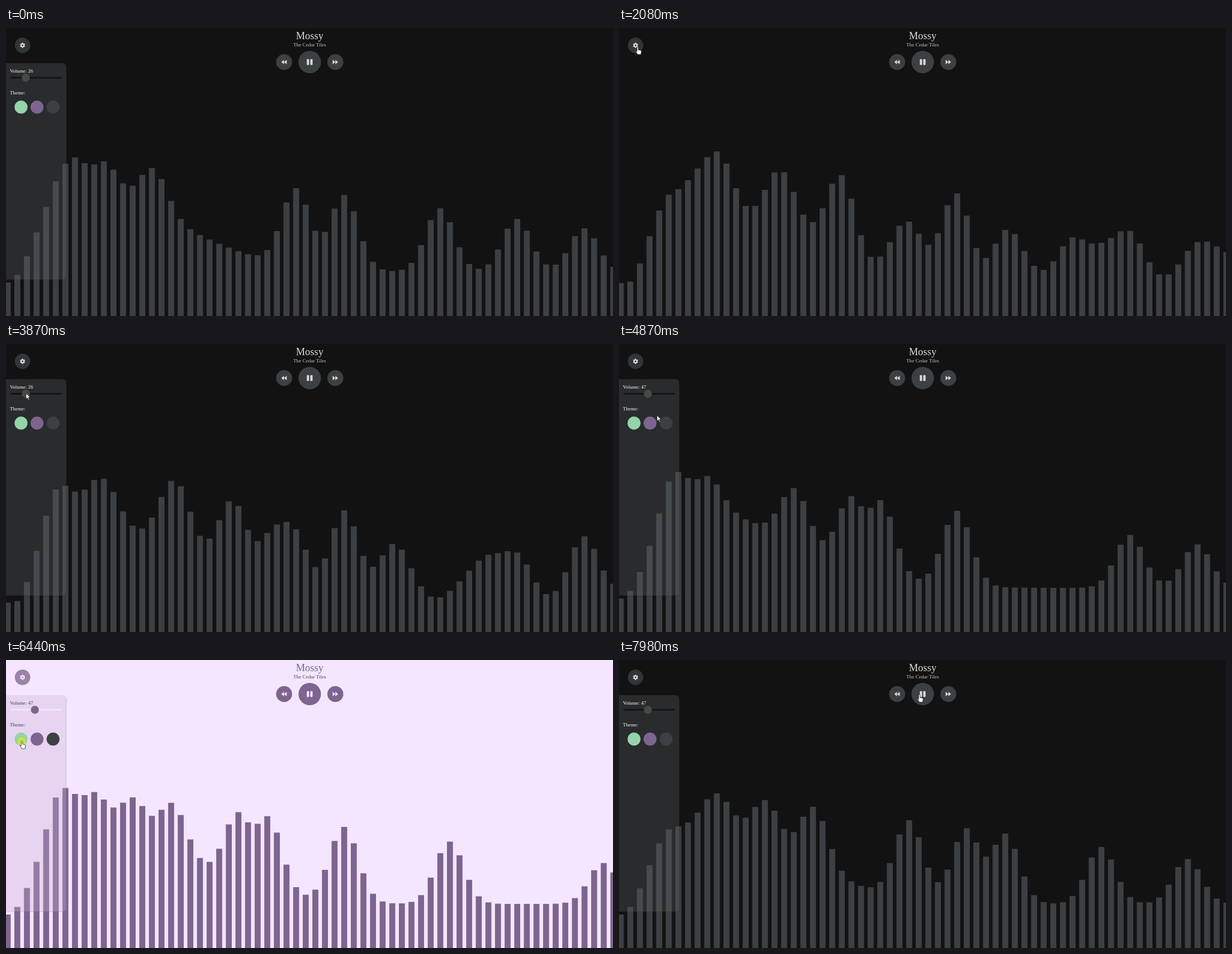
Recreate the animation shown at these times as an HTML page. Size 1086 px wide and 516 px high, loop 8 s.

```html
<!DOCTYPE html>
<html lang="en">
<head>
<meta charset="utf-8">
<title>Music visualizer</title>
<style>
html, body { margin: 0; width: 100%; height: 100%; overflow: hidden; }
svg { display: block; width: 1086px; height: 516px; background: var(--bg); font-family: "Liberation Serif", "Times New Roman", serif; }
.dark { --bg: #121212; --main: #3c4043; --icon: #d8d9da; --title: #dcdcdc; --sub: #c4c4c4; --text: #fff; --thumb: #484848; --panel: rgba(95,99,104,.3); }
.purple { --bg: #f4e6ff; --main: #7d6590; --icon: #f4e6ff; --title: #7d6590; --sub: #4a4650; --text: #3c4043; --thumb: #7d6590; --panel: rgba(200,171,206,.31); }
.green { --bg: #f0fcf0; --main: #94d3ac; --icon: #f0fcf0; --title: #94d3ac; --sub: #4a504c; --text: #3c4043; --thumb: #94d3ac; --panel: rgba(193,229,203,.32); }
#bars, #buttons { fill: var(--main); }
#icons { fill: var(--icon); }
#panel text { fill: var(--text); font-size: 9px; }
.cursor { fill: #fff; stroke: #222; stroke-width: .8; stroke-linejoin: round; }
</style>
</head>
<body>
<svg id="stage" class="dark" viewBox="0 0 1086 516">
  <g id="bars"></g>

  <g text-anchor="middle">
    <text x="543.3" y="20.3" font-size="18.4" fill="var(--title)">Mossy</text>
    <text x="543.3" y="33" font-size="9.2" fill="var(--sub)">The Cedar Tiles</text>
  </g>

  <g id="buttons"></g>
  <g id="icons">
    <g id="gear" transform="translate(29.6 31)">
      <circle r="2.5" fill="none" stroke="var(--icon)" stroke-width="2.1"/>
    </g>
    <path id="skip" d="M492.6 61l4.8-4v8zm4.9 0l4.8-4v8z"/>
    <use href="#skip" transform="matrix(-1 0 0 1 1086.7 0)"/>
    <rect x="538.2" y="55.7" width="4.1" height="10.6" rx="1"/>
    <rect x="544.4" y="55.7" width="4.1" height="10.6" rx="1"/>
  </g>

  <g id="panel">
    <path d="M0 63h101a7 7 0 0 1 7 7v374a7 7 0 0 1-7 7h-101z" fill="var(--panel)"/>
    <path d="M107.9 68v376a7 7 0 0 1-7 7h-101" fill="none" stroke="#000" stroke-opacity=".13"/>
    <text id="volume" x="7" y="80.3"></text>
    <rect x="7.6" y="87.7" width="92.6" height="2.7" rx="1.3" fill="var(--bg)"/>
    <circle id="thumb" cy="89.2" r="7.2" fill="var(--thumb)"/>
    <text x="7" y="119.3">Theme:</text>
  </g>

  <g id="pointer">
    <circle id="press" r="7.5" fill="#eef000" fill-opacity=".57"/>
    <path id="arrow" class="cursor" d="M0 0v10l2.4-2.2 1.7 3.6 1.6-.8-1.7-3.5h3.2z"/>
    <path id="hand" class="cursor" d="M-.8 1.2a1.2 1.2 0 0 1 2.4 0v4l4.2 1q1.6.5 1.3 2.1l-.9 5.2h-5.6l-3.6-5q.4-1.7 2.2 0z"/>
  </g>
</svg>
<script>
const LOOP = 8000, STEP = 77.6, BARS = 64, PRESS = 130;
const $ = id => document.getElementById(id);
const clamp = (v, lo, hi) => Math.max(lo, Math.min(hi, v));
const mix = (a, b, u) => a + (b - a) * u;
const ease = (t, from, to) => {
  const u = clamp((t - from) / (to - from), 0, 1);
  return u * u * (3 - 2 * u);
};
const make = (parent, tag, attrs) => {
  const el = document.createElementNS("http://www.w3.org/2000/svg", tag);
  for (const key in attrs) el.setAttribute(key, attrs[key]);
  return $(parent).appendChild(el);
};

// Everything round that can be clicked
const hotspots = [];
function disc(parent, cx, cy, r, style) {
  hotspots.push({ cx, cy, r });
  make(parent, "circle", { cx, cy, r, ...style });
}
disc("buttons", 29.6, 31, 13.8, { opacity: 0.77 });
for (const k of [-1, 0, 1]) disc("buttons", 543.4 + 45.8 * k, 61, k ? 14.3 : 20.1);
["#94d3ac", "#7d6590", "#3c4043"].forEach((fill, k) => disc("panel", 26.9 + 28.65 * k, 141.7, 11.6, { fill }));
for (let a = 0; a < 360; a += 60)
  make("gear", "rect", { x: -1.1, y: -4.7, width: 2.2, height: 2, rx: 0.4, transform: `rotate(${a})` });
const bars = Array.from({ length: BARS }, (_, i) =>
  make("bars", "rect", { x: 17.2 * i - 2.3, width: 10.7, height: 516 }));

// The chord heard at a step, as the bars where its notes peak
const chords = [
  { at: 0, notes: [7, 10, 15, 30, 35, 45, 53, 60] },
  { at: 16, notes: [8, 10, 16, 23, 35, 47, 53, 62] },
  { at: 38, notes: [10, 17, 23, 30, 35, 40, 50, 60] },
  { at: 63, notes: [6, 9, 18, 24, 27, 35, 53, 60] },
  { at: 83, notes: [6, 9, 13, 17, 24, 27, 35, 46, 62] },
  { at: 96, notes: [6, 9, 15, 18, 26, 35, 43, 52, 61] },
  { at: 103, notes: [10, 15, 20, 30, 36, 40, 50, 59] }
];

// Notes lift the bars from a valley line to a crest line; the lowest bars fade in.
function spectrum({ notes }, i) {
  const rest = notes.reduce((p, n) => p * (1 - Math.exp(-(((i - n) / 2.1) ** 2))), 1);
  const valley = 437 - 137 * Math.exp(-((Math.max(0, i - 8) / 14) ** 2));
  const crest = 215 + 2.4 * i;
  return mix(456, mix(crest, valley, rest), ease(i, 0, 5.5));
}

function barTop(i, step) {
  const next = clamp(chords.findIndex(c => c.at >= step), 1, chords.length - 1);
  const a = chords[next - 1], b = chords[next], u = (step - a.at) / (b.at - a.at);
  const sway = 20 * Math.sin(Math.PI * u) * Math.sin(i * 0.8 + step * 0.7) * Math.cos(i * 0.23 - step * 0.45);
  return mix(spectrum(a, i), spectrum(b, i), u) + sway;
}

// Where the pointer rests, and when
const rests = [
  { from: 0, to: 500, x: -15, y: 210 },
  { from: 1120, to: 3500, x: 33, y: 34 },
  { from: 3900, to: 4080, x: 36, y: 89 },
  { from: 4500, to: 4600, x: 52, y: 89 },
  { from: 4870, to: 4930, x: 68, y: 128 },
  { from: 5230, to: 6060, x: 56, y: 142 },
  { from: 6360, to: 6800, x: 28, y: 145.5 },
  { from: 7300, to: 7600, x: 83, y: 140 },
  { from: 7980, to: LOOP, x: 537, y: 62 }
];
const clicks = { close: 1180, open: 2636, purple: 5300, green: 6390, dark: 7390 };
const drag = { from: 4080, to: 4500 };

function pointerAt(t) {
  const n = rests.findIndex(r => r.to >= t), b = rests[n], a = rests[n - 1] || b;
  const u = ease(t, a.to, b.from);
  return n ? [mix(a.x, b.x, u), mix(a.y, b.y, u)] : [b.x, b.y];
}

const themeAt = t => ["dark", "green", "purple"].find(name => t >= clicks[name] + PRESS) || "dark";
const slide = (t, click) => ease(t, click + PRESS, click + PRESS + 400);
const pressed = t => Object.values(clicks).some(c => t >= c && t < c + PRESS)
  || t >= drag.from && t < drag.to;
const show = (id, on) => $(id).setAttribute("visibility", on ? "visible" : "hidden");

function draw(now) {
  const step = Math.floor((now % LOOP + 22) / STEP), t = step * STEP;
  $("stage").setAttribute("class", themeAt(t));
  bars.forEach((bar, i) => bar.setAttribute("y", barTop(i, step).toFixed(1)));

  const hidden = slide(t, clicks.close) - slide(t, clicks.open);
  $("panel").setAttribute("transform", `translate(${-109 * hidden} 0)`);
  const volume = Math.round(mix(26, 47, ease(t, drag.from, drag.to)));
  $("volume").textContent = "Volume: " + volume;
  $("thumb").setAttribute("cx", 15.3 + 0.773 * volume);

  const [x, y] = pointerAt(t);
  const hover = hotspots.some(({ cx, cy, r }) => Math.hypot(x - cx, y - cy) < r);
  $("pointer").setAttribute("transform", `translate(${x} ${y})`);
  show("press", pressed(t));
  show("hand", hover);
  show("arrow", !hover);
}

const start = performance.now();
function frame() {
  draw(performance.now() - start);
  requestAnimationFrame(frame);
}
frame();
</script>
</body>
</html>
```
